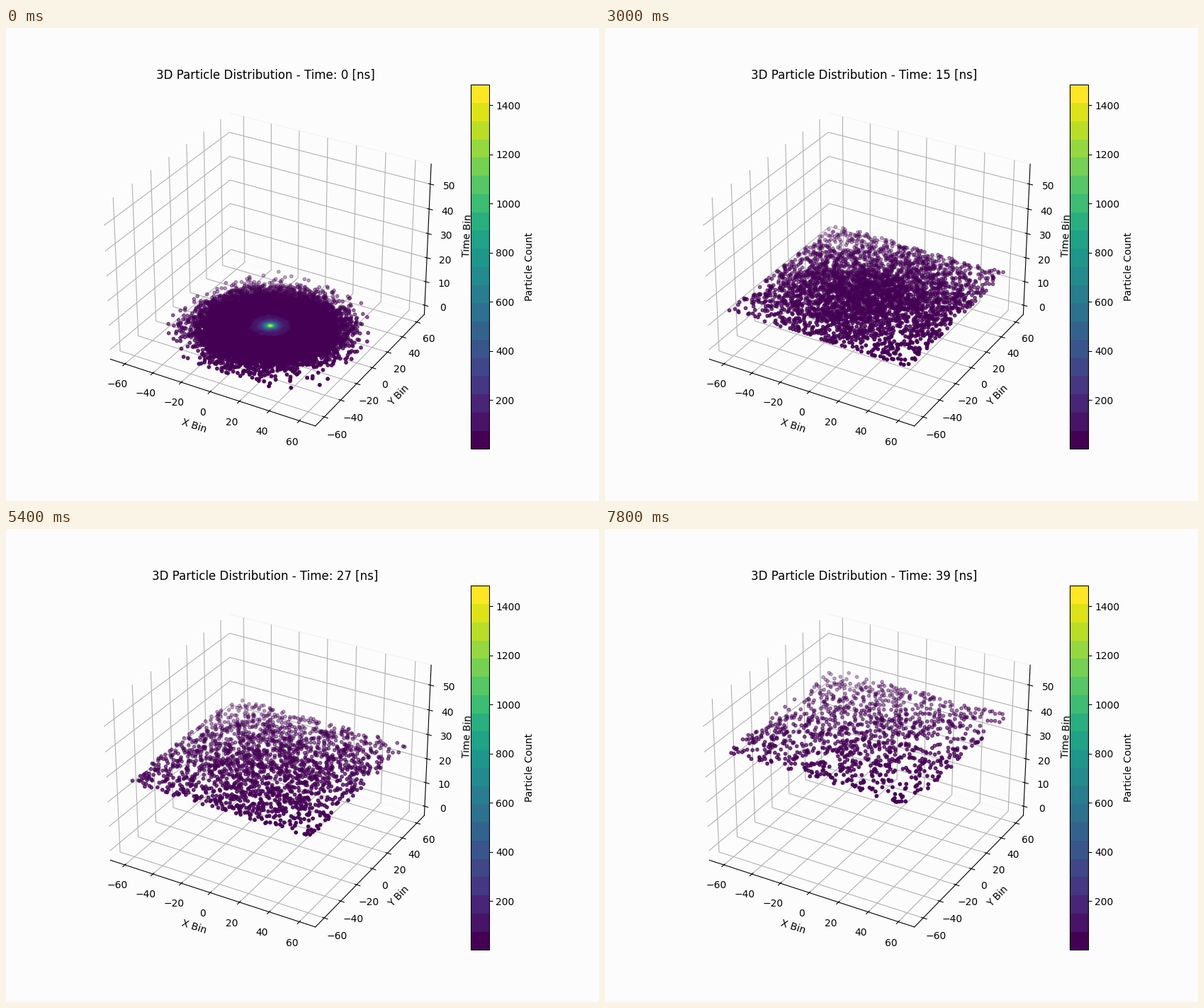
A matplotlib script that plays this animation: 837 by 669 pixels, repeating every 8000 ms.

```python
import numpy as np
import matplotlib.pyplot as plt
from matplotlib.animation import FuncAnimation
from matplotlib.cm import ScalarMappable
from matplotlib.colors import Normalize

STEPS = 40
PEAK = 1484
HALF = 61
PAPER = "#fcfcfc"

bins = np.arange(-HALF, HALF + 1)
gx, gy = (g.ravel() for g in np.meshgrid(bins, bins))
radius = np.hypot(gx, gy)

cmap = plt.get_cmap("viridis", 20)
norm = Normalize(1, PEAK)

# the small surplus keeps the pixel size from rounding down
fig = plt.figure(figsize=(8.37001, 6.69001), dpi=100, facecolor=PAPER)
ax = fig.add_subplot(projection="3d")
ax.set_facecolor(PAPER)
fig.colorbar(ScalarMappable(norm, cmap), ax=ax, label="Particle Count")

ax.set_xlim(-70.5, 70.5)
ax.set_ylim(-70.5, 70.5)
ax.set_zlim(-3.94, 57.94)
ax.set_xlabel("X Bin")
ax.set_ylabel("Y Bin")
ax.set_zlabel("Time Bin")
for axis in (ax.xaxis, ax.yaxis, ax.zaxis):
    axis.pane.set_fill(False)
    axis.pane.set_edgecolor((1, 1, 1, 0))
ax.yaxis.pane.set_edgecolor("#ececec")

cloud = None


def density(t):
    """Mean count per bin: a decaying burst plus a ballistic spread."""
    mean = PEAK * np.exp(-1.8 * t) / (1 + (radius / 2.77) ** 2)
    if t:
        mean += 155 / (t**2 + radius**2 / 4.5)
    return mean


def sample(t):
    rng = np.random.default_rng([11, t])
    counts = rng.poisson(density(t))
    if t == 0:
        counts = np.maximum(counts, 1)
    # the expanding front limits how far particles have come
    reach = 1 / (1 + np.exp((radius - 44 - 16 * t) / 4.5))
    hit = (counts > 0) & (rng.random(radius.size) < reach)
    return gx[hit], gy[hit], counts[hit]


def update(t):
    global cloud
    if cloud is not None:
        cloud.remove()
    x, y, counts = sample(t)
    cloud = ax.scatter(x, y, np.full(x.size, t), c=counts, cmap=cmap,
                       norm=norm, s=10)
    ax.set_title(f"3D Particle Distribution - Time: {t} [ns]")
    return (cloud,)


anim = FuncAnimation(fig, update, frames=STEPS, interval=200,
                     init_func=lambda: (), repeat=True, repeat_delay=0,
                     blit=False)
plt.show()
```
